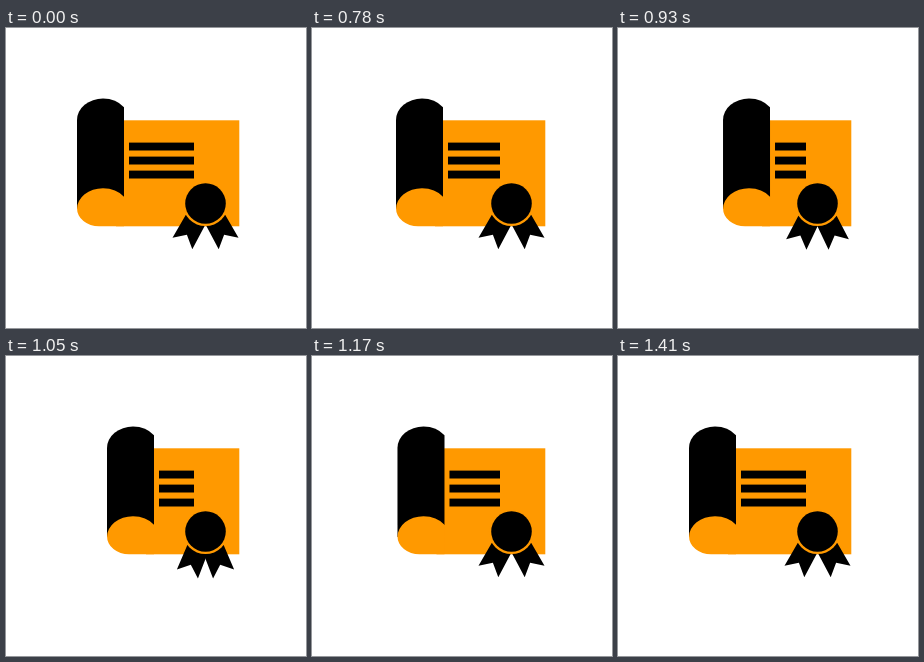
Write an HTML page with a canvas that moves like this. It is 300 px wide and 300 px high and loops after 1.8 s.

```html
<!DOCTYPE html>
<html lang="en">
<head>
<meta charset="utf-8">
<title>Certificate</title>
<style>
  html, body { margin: 0; width: 100%; height: 100%; overflow: hidden; background: #fff; }
  canvas { display: block; width: 300px; height: 300px; }
</style>
</head>
<body>
<canvas id="stage" width="300" height="300"></canvas>
<script>
const ctx = document.getElementById('stage').getContext('2d');
const LOOP = 1800, STEP = 30;
const ORANGE = '#ff9900', BLACK = '#000';
const PULL = 30, SWING = 7.7 * Math.PI / 180;
const SEAL = { x: 199.5, y: 175.5 };

const clamp = v => Math.min(1, Math.max(0, v));
const progress = (t, start, end) => clamp((t - start) / (end - start));

// Cubic bezier easing, solved for x by bisection.
function bezier(x1, y1, x2, y2) {
  const at = (u, a, b) => 3 * u * (1 - u) ** 2 * a + 3 * u * u * (1 - u) * b + u ** 3;
  return x => {
    if (x <= 0 || x >= 1) return clamp(x);
    let lo = 0, hi = 1;
    for (let i = 0; i < 30; i++) {
      const mid = (lo + hi) / 2;
      if (at(mid, x1, x2) < x) lo = mid; else hi = mid;
    }
    return at(lo, y1, y2);
  };
}
const overshoot = bezier(0.405, 0, 0.336, 1.6);

function fillPath(color, build) {
  ctx.fillStyle = color;
  ctx.beginPath();
  build();
  ctx.fill();
}

function rect(color, left, top, right, bottom) {
  ctx.fillStyle = color;
  ctx.fillRect(left, top, right - left, bottom - top);
}

function disc(color, radius) {
  fillPath(color, () => ctx.arc(SEAL.x, SEAL.y, radius, 0, Math.PI * 2));
}

function drawPaper(shift) {
  rect(ORANGE, 110 + shift, 92.3, 233.3, 198.3);
  for (let i = 0; i < 3; i++) {
    const top = 114.6 + i * 14;
    rect(BLACK, 123 + shift, top, 188, top + 7.9);
  }
}

function drawRoll(shift) {
  const edge = Math.acos(21 / 26);
  ctx.save();
  ctx.translate(shift, 0);
  fillPath(BLACK, () => {
    ctx.ellipse(97, 92, 26, 21.5, 0, Math.PI, -edge);
    ctx.lineTo(118, 169);
    ctx.lineTo(71, 181);
  });
  fillPath(ORANGE, () => {
    ctx.ellipse(97, 181, 26, 20.8, 0, Math.PI, -edge);
    ctx.lineTo(118, 198.3);
    ctx.lineTo(93, 198.3);
    ctx.ellipse(93, 180.3, 22, 18, 0, Math.PI / 2, Math.PI);
  });
  ctx.restore();
}

function drawTail(side, angle) {
  ctx.save();
  ctx.translate(SEAL.x, SEAL.y);
  ctx.scale(side, 1);
  ctx.rotate(angle);
  fillPath(BLACK, () => {
    ctx.moveTo(10, 6);
    ctx.lineTo(19.8, 11.5);
    ctx.lineTo(33, 34.2);
    ctx.lineTo(18.6, 31.2);
    ctx.lineTo(13.2, 45.7);
    ctx.lineTo(0.6, 22);
  });
  ctx.restore();
}

function draw(t) {
  const shift = PULL * (overshoot(progress(t, 670, 1030)) - overshoot(progress(t, 1050, 1410)));
  const angle = SWING * Math.sin(Math.PI * progress(t, 870, 1170)) ** 2;
  rect('#fff', 0, 0, 300, 300);
  drawPaper(shift);
  drawRoll(shift);
  drawTail(-1, angle);
  drawTail(1, angle);
  disc(ORANGE, 22.6);
  disc(BLACK, 20.3);
}

function tick() {
  const t = performance.now() % LOOP;
  draw(Math.floor(t / STEP) * STEP);
  requestAnimationFrame(tick);
}
tick();
</script>
</body>
</html>
```
